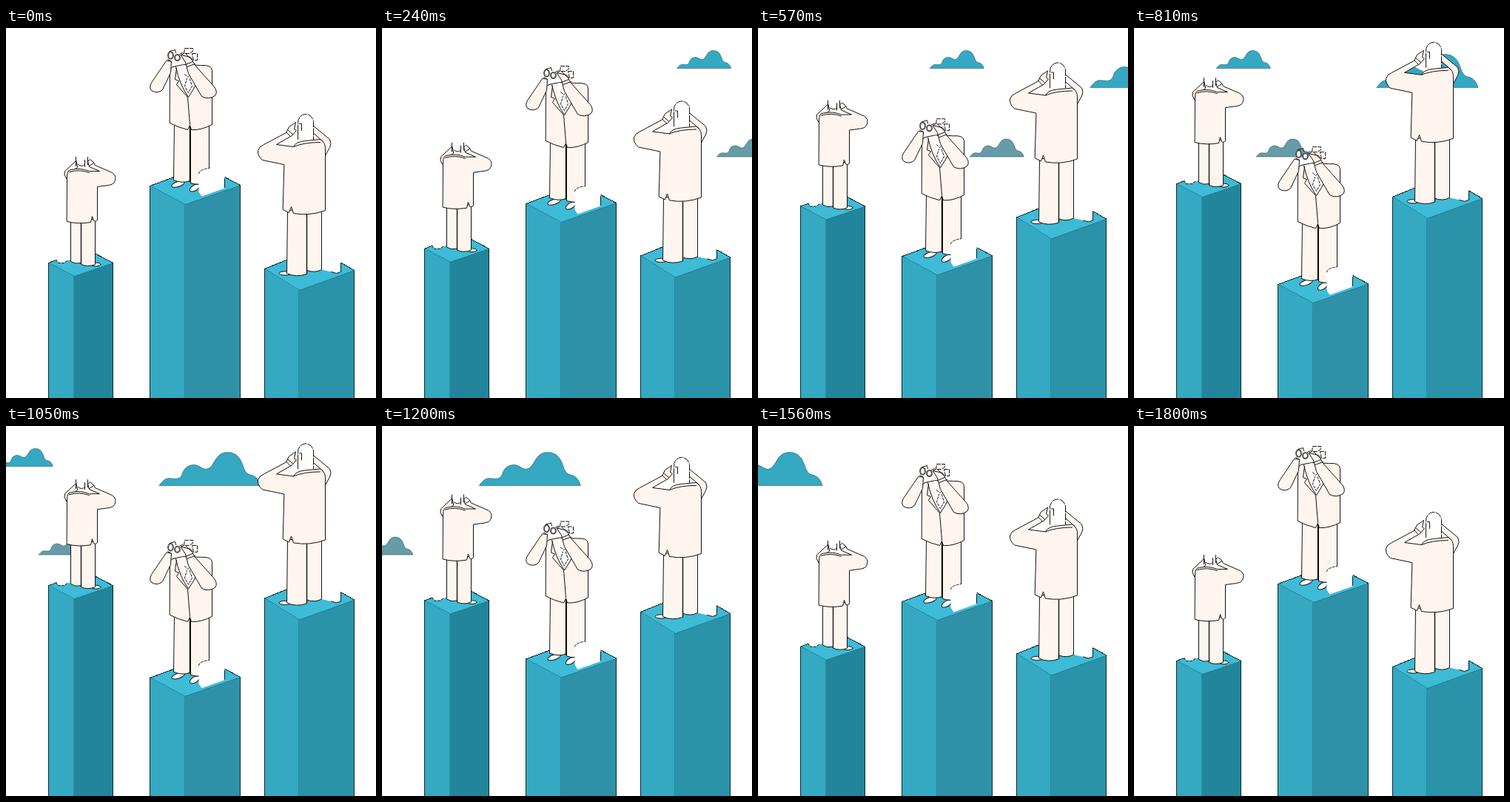
An HTML page for the animation above (1.83 s loop, 500x500 px).

```html
<!DOCTYPE html>
<html lang="en">
<head>
<meta charset="utf-8">
<title>Lookouts</title>
<style>
  html, body { margin: 0; width: 100%; height: 100%; overflow: hidden; background: #fff; }
  svg { display: block; width: 100vw; height: 100vh; }
  .pillar { shape-rendering: crispEdges; }
  .man path, .man ellipse { fill: none; stroke: #15110f; stroke-width: 1; stroke-linejoin: round; stroke-linecap: round; }
  .man .skin { fill: #fff5ef; }
  .man .white { fill: #fff; }
  .man .bare { fill: #fff; stroke: none; }
  .man .bold { stroke-width: 1.4; }
  .man .lens { fill: #fff; stroke: #554d49; stroke-width: 2; }
  .cloud { stroke: #17404b; stroke-width: .5; }
</style>
</head>
<body>
<svg viewBox="0 0 500 500">
  <defs>
    <path id="puff" vector-effect="non-scaling-stroke" d="M0 24C3 20 5 18.5 8 18.7C12 19 15 20 16.5 16C18 10.5 22 9 25 9C29 9 31 12.5 34.5 12C40 11 40 0 49 0C57 0 59 6 60.5 10C62 15 64 16 67 16.5Q71.5 18 73 24Z"/>
  </defs>

  <!-- Half-pixel shift keeps one-pixel lines sharp. -->
  <g transform="translate(.5 .5)">
  <g id="clouds">
    <use href="#puff" class="cloud" fill="#35a8c2"/>
    <use href="#puff" class="cloud" fill="#659ca8"/>
    <use href="#puff" class="cloud" fill="#35a8c2"/>
  </g>

  <g id="left">
    <g class="pillar"></g>
    <g class="man">
      <path class="bare" d="M68 300V314L71 317H78L82 314L88 312V300Z"/>
      <path d="M67 313L70 317H78L82 314" stroke-dasharray="3 2"/>
      <ellipse class="white" cx="121" cy="319" rx="6.5" ry="2.4"/>
      <path class="skin" d="M87 258V315Q93 319 101 317V258Z"/>
      <path class="skin" d="M101 258V319Q110 323 120 319V258Z"/>
      <path class="bold" d="M101 262V318"/>
      <path class="bare" d="M94 174H111V194H94Z"/>
      <path class="skin" d="M94 179L79 193Q77 197 81 203L85 196L96 188Z"/>
      <path class="skin" d="M82 200Q82 191 88 191Q100 188 112 193L126 193L112 187L110 180L113 177L118 181L120 185L143 195Q149 199 147 205Q146 211 138 212L123 214V259Q120 262 118 260L116 254L114 262Q97 265 82 261Z"/>
      <path d="M85 194Q99 190 112 195M94 174V186M106 178V187M110 174V184M97 184Q102 188 106 184M112 186L118 182"/>
    </g>
  </g>

  <g id="middle">
    <g class="pillar"></g>
    <g class="man">
      <ellipse class="white" cx="232" cy="210.5" rx="9" ry="3.4" transform="rotate(-18 232 210.5)"/>
      <ellipse class="white" cx="254.5" cy="215.5" rx="7.5" ry="3.8" transform="rotate(-32 254.5 215.5)"/>
      <path class="skin" d="M227 130L226 205Q238 210 248 206V130Z"/>
      <path class="skin" d="M249 130V209Q261 213 274 208V130Z"/>
      <path class="bold" d="M248 134V207"/>
      <path class="bare" d="M236 30H258V58H236Z"/>
      <path class="skin" d="M221 58Q221 52 229 51L240 49L263 50Q278 49 278 57V130Q263 138 250 137L248 131L245 137Q232 134 221 128Z"/>
      <path class="bare" d="M237 50L240 73L246 92L259 64L252 51Z"/>
      <path d="M229 52Q234 76 246 93Q253 83 259 70M230 54L228 69L233 71L230 76L245 93L248 130"/>
      <path d="M241 62L245 66L250 61L248 69L251 78L246 87L241 78L244 68" stroke-dasharray="3 2"/>
      <path class="skin" d="M216 44L197 72Q192 79 196 84Q204 89 211 83L222 60L223 45Z"/>
      <path class="skin" d="M236 36L241 33L251 43L255 50L281 79Q286 86 282 91Q273 97 264 92L246 61L242 46Z"/>
      <path d="M242 49L252 45M244 52L255 48M218 42L223 45"/>
      <path class="white" d="M241 27H252V31L247 34H240ZM251 34H258V43H253Z" stroke-dasharray="5 2"/>
      <path d="M236 36L249 39L252 43"/>
      <ellipse class="lens" cx="222" cy="36.5" rx="3.4" ry="4.8"/>
      <ellipse class="lens" cx="231" cy="39.5" rx="3.4" ry="4"/>
      <path d="M221 31L228 29L229 33M234 35L238 33"/>
      <path class="bare" d="M260 195Q261 191 274.5 189V184H295V216L264 227L260 221Z"/>
      <path d="M260 196Q261 191 274 189" stroke-dasharray="3 2"/>
      <path d="M295 203V215"/>
    </g>
  </g>

  <g id="right">
    <g class="pillar"></g>
    <g class="man">
      <path class="bare" d="M424 294H452V329L446 331L439 329L426 326Z"/>
      <path d="M452 317V329L446 331L439 329"/>
      <ellipse class="white" cx="377" cy="331" rx="8.5" ry="2.6"/>
      <path class="skin" d="M406 246V327Q417 331 426 326V246Z"/>
      <path class="skin" d="M380 246L379 331Q391 337 406 332V246Z"/>
      <path class="bold" d="M406 252V331"/>
      <path class="skin" d="M414 131L437 150Q440 156 437 161L431 172L420 154L428 153L413 140Z"/>
      <path class="bare" d="M394 130H415V156H390Z"/>
      <path class="white" d="M394 140V128A10.5 11 0 0 1 415 126V150" stroke-dasharray="9 2"/>
      <path d="M396 129H399V138M394 139V150"/>
      <path class="skin" d="M375 184L346 178Q339 172 340 165Q341 160 348 157L378 141L382 133L388 129L391 127L389 136L392 138L386 145L365 157L388 160Q391 153 404 152L424 150Q431 154 431 162V246Q410 254 388 250L385 241L382 249L374 245Z"/>
      <path d="M388 160Q402 154 424 154M378 140L384 146M380 137L387 143"/>
    </g>
  </g>
  </g>
</svg>

<script>
const LOOP = 1830, STEP = 30, HALF = 900, WIND = 0.504;

// Corners of each top face, travel over half a swing, and shade of the right side.
const pillars = [
  { id: "left",   west: [57, 317],  south: [91, 335],  east: [144, 317], north: [108, 298], travel: -110, shade: "#22859c" },
  { id: "middle", west: [194, 213], south: [241, 238], east: [316, 212], north: [267, 186], travel: 137,  shade: "#2f91a8" },
  { id: "right",  west: [349, 325], south: [395, 354], east: [470, 327], north: [418, 297], travel: -100, shade: "#2a93aa" }
];

// Left edge at time zero, top and scale.
const clouds = [
  { x: 519, y: 30, scale: 1 },
  { x: 573, y: 149.5, scale: 1 },
  { x: 735.5, y: 35, scale: 1.88 }
];

const cloudNodes = document.querySelectorAll("#clouds use");

function face(points, fill) {
  return `<polygon points="${points.join(" ")}" fill="${fill}"/>`;
}

function line(points, color, width) {
  return `<polyline points="${points.join(" ")}" fill="none" stroke="${color}" stroke-width="${width}"/>`;
}

for (const p of pillars) {
  const down = ([x]) => [x, 800];
  p.node = document.getElementById(p.id);
  p.node.querySelector(".pillar").innerHTML =
    face([p.west, p.south, down(p.south), down(p.west)], "#35a8c2") +
    face([p.south, p.east, down(p.east), down(p.south)], p.shade) +
    face([p.west, p.south, p.east, p.north], "#3dbbd7") +
    line([p.west, p.south, p.east], "#1d7187", 0.7) +
    line([p.south, down(p.south)], "#22849b", 0.7) +
    line([down(p.west), p.west, p.north, p.east, down(p.east)], "#10272d", 1);
}

function swing(t) {
  const u = (t <= HALF ? t : 2 * HALF - t) / HALF;
  return u * u * (3 - 2 * u);
}

function draw(t) {
  const s = swing(t);
  for (const p of pillars) {
    p.node.setAttribute("transform", `translate(0 ${p.travel * s})`);
  }
  clouds.forEach((c, i) => {
    cloudNodes[i].setAttribute("transform", `translate(${c.x - WIND * t} ${c.y}) scale(${c.scale})`);
  });
}

const start = performance.now();
function tick(now) {
  const t = Math.max(0, now - start) % LOOP;
  draw(Math.floor(t / STEP) * STEP);
  requestAnimationFrame(tick);
}
draw(0);
requestAnimationFrame(tick);
</script>
</body>
</html>
```
